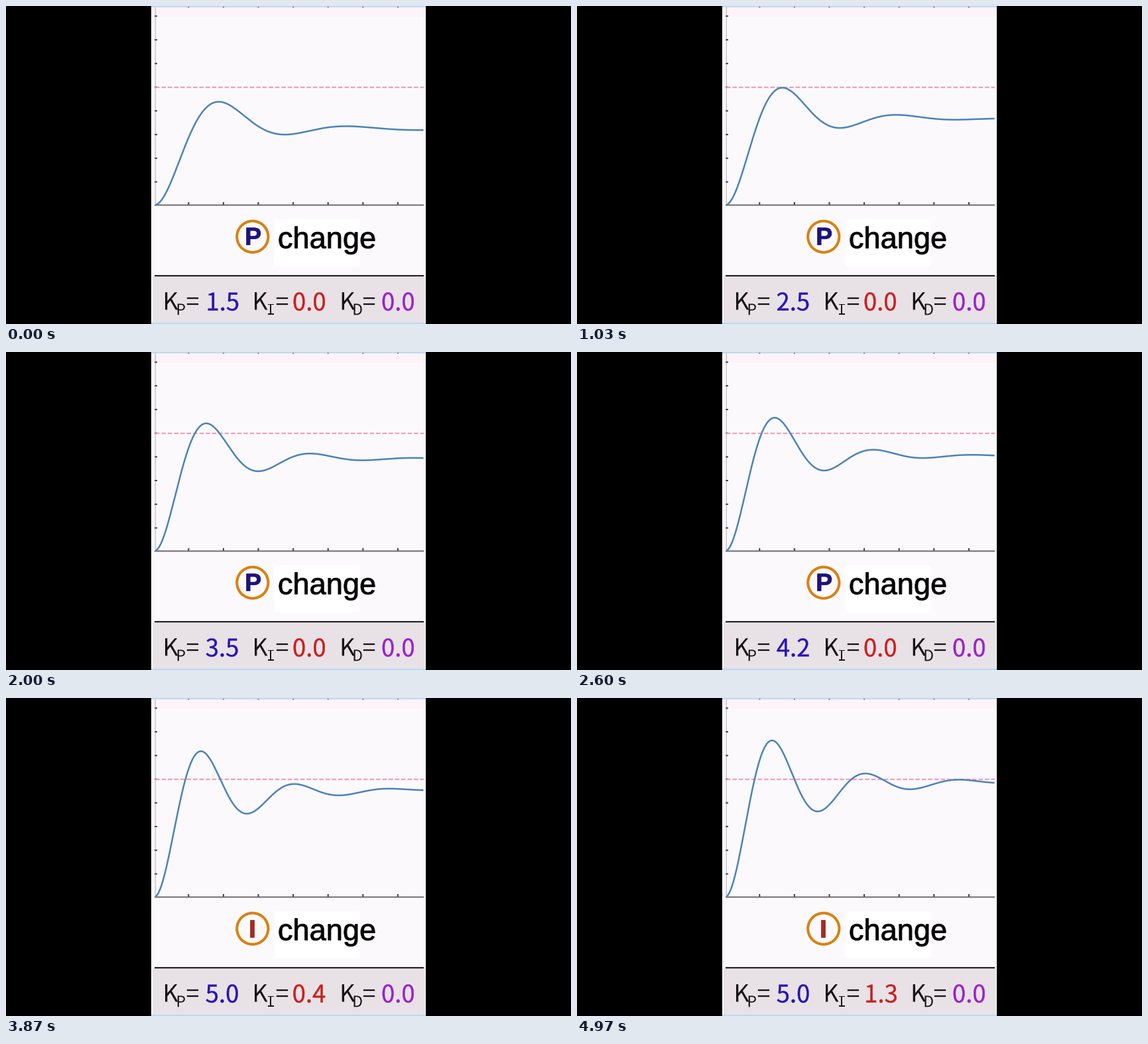
Recreate the animation shown at these times as a matplotlib script. Size 852 by 480 pixels, loop 5.01 s.

```python
import numpy as np
import matplotlib.pyplot as plt
from matplotlib.animation import FuncAnimation
from matplotlib.patches import Circle, PathPatch, Rectangle
from matplotlib.path import Path
from matplotlib.textpath import TextPath

W, H, DPI = 852, 480, 100
FRAMES, STEP = 167, 30
PX = 72 / DPI  # points per pixel

ORIGIN = 223.6       # x where the response starts
ZERO, UNIT = 300.4, 177.6  # y of level 0, height of level 1
I_START = 3.34       # seconds

SANS = dict(family="Noto Sans CJK JP")
MONO = dict(family="DejaVu Sans Mono")
ARIAL = dict(family="Liberation Sans")
BOLD = dict(family="Liberation Sans", weight="bold")
INK = "#151317"

fig = plt.figure(figsize=(W / DPI, H / DPI), dpi=DPI, facecolor="black")
ax = fig.add_axes([0, 0, 1, 1])
ax.set_xlim(0, W)
ax.set_ylim(H, 0)
ax.axis("off")


def box(x0, y0, x1, y1, color):
    ax.add_patch(Rectangle((x0, y0), x1 - x0, y1 - y0, fc=color, lw=0))


def line(xs, ys, color, width, **kw):
    return ax.plot(xs, ys, color=color, lw=width * PX, snap=False,
                   solid_capstyle="butt", **kw)[0]


def glyphs(text, x, base, size, font, anchor="left"):
    """Outline of text, its ink placed by left edge or centre."""
    path = TextPath((0, 0), text, size=size, prop=font)
    ink = path.get_extents()
    ref = ink.x0 if anchor == "left" else (ink.x0 + ink.x1) / 2
    return Path(path.vertices * [1, -1] + [x - ref, base], path.codes)


def label(text, x, base, size, font, color, anchor="left", weight=0.0):
    path = glyphs(text, x, base, size, font, anchor)
    return ax.add_patch(PathPatch(path, fc=color, ec=color, lw=weight * PX, zorder=4))


def number(x, color):
    return label("0.0", x, 459.5, 36.5, SANS, color, "center", 0.4)


def set_number(patch, value, x):
    text = f"{value:.1f}"
    x += 1.8 * text.startswith("1") + 6 * text.endswith("1")
    patch.set_path(glyphs(text, x, 459.5, 36.5, SANS, "center"))


# Card and panels
box(219, 0, 633, 480, "#fcf9fd")
box(219, 2, 633, 16, "#fdf3f9")
box(405, 322, 533, 393, "#ffffff")
box(221, 408, 631.5, 478, "#e8e2e7")
box(219, 0, 633, 1.6, "#bcd9f4")
box(219, 478, 633, 480, "#bcd9f4")
line([224, 630], [407.2, 407.2], "#111111", 2)

# Axes
line([225.3, 225.3], [2, 300], "#c9c6cb", 1.5)
line([224, 630], [300.5, 300.5], "#6f6a70", 2)
for x in 275.3 + 52.6 * np.arange(7):
    line([x, x], [296, 300], "#444147", 2)
    line([x, x], [1, 2.6], "#77777c", 2)
for y in 15.3 + 35.75 * np.arange(8):
    line([224.3, 228], [y, y], "#444147", 2)
line([225, 630], [122.8, 122.8], "#ee9abb", 2.1, ls=(0, (3.15, 1.38)), dash_capstyle="butt")

curve = line([], [], "#4a83b9", 2.5, zorder=3, solid_joinstyle="round")

# Badge and caption
ax.add_patch(Circle((371.8, 348.2), 23.6, fc="none", ec="#d9800f", lw=4 * PX))
badge_p = label("P", 373.3, 360.6, 37.5, BOLD, "#1c1478", "center", 0.8)
badge_i = label("I", 371.2, 361, 38, BOLD, "#a52a20", "center", 0.8)
label("change", 411.8, 365.5, 45.2, ARIAL, "#050505", weight=0.9)

# Gain read-outs
for x_k, x_sub, x_eq, sub, font in [
    (240, 258.7, 272.5, "P", SANS),
    (375, 394.5, 407.5, "I", MONO),
    (506.7, 524.5, 538.5, "D", SANS),
]:
    label("K", x_k, 458.5, 36, SANS, INK)
    label(sub, x_sub, 466.3, 23, font, INK)
    label("=", x_eq, 459, 37, SANS, INK, weight=0.3)

kp_text = number(325.6, "#2814b2")
ki_text = number(457.3, "#c9201f")
number(591.3, "#9a22c8")


def response(kp, ki):
    """Damped ringing around a level that drifts towards the set point."""
    x = np.linspace(226, 629.5, 500)
    dx = x - ORIGIN

    def level(d):
        error = np.exp(-ki * (0.2 + 0.0034 * d)) / (kp + 1)
        return 1 - error + 0.395 * np.exp(-kp - d / 650)

    half = 165.2 / np.sqrt(1.75 + 0.763 * kp)       # half period in pixels
    decay = -np.log(0.25 + 0.035 * kp + 0.046 * ki)  # per half period
    u = dx / half
    ring = np.exp(-decay * u) * (np.cos(np.pi * u) + decay / np.pi * np.sin(np.pi * u))
    return x, ZERO - UNIT * (level(dx) - level(0) * ring)


def update(i):
    t = i * STEP / 1000
    kp = min(5, 1.451 + 1.05 * t)
    ki = max(0, 0.82 * (t - 3.38))
    curve.set_data(*response(kp, ki))
    set_number(kp_text, kp, 325.6)
    set_number(ki_text, ki, 457.3)
    badge_p.set_visible(t < I_START)
    badge_i.set_visible(t >= I_START)
    return curve, kp_text, ki_text, badge_p, badge_i


anim = FuncAnimation(fig, update, frames=FRAMES, interval=STEP, repeat=True, repeat_delay=0)
plt.show()
```
